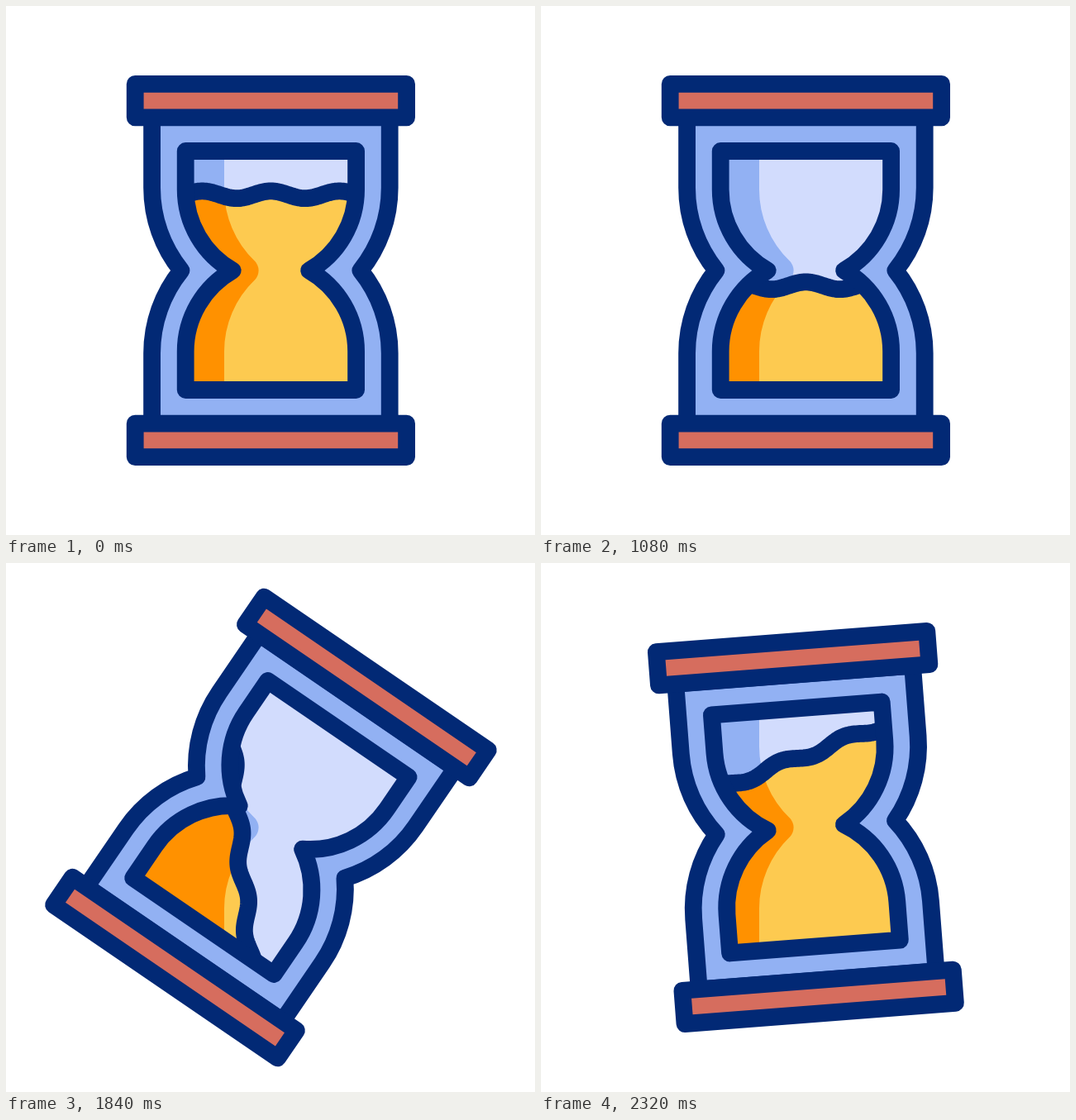
Write an HTML page with a canvas that moves like this. It is 640x640 px and loops after 2.36 s.

```html
<!DOCTYPE html>
<html lang="en">
<head>
<meta charset="utf-8">
<title>Hourglass</title>
<style>
  html, body { margin: 0; height: 100%; overflow: hidden; background: #fff; }
  canvas { display: block; width: 100vw; height: 100vh; }
</style>
</head>
<body>
<canvas id="stage" width="640" height="640"></canvas>
<script>
const ctx = document.getElementById('stage').getContext('2d');

const LOOP = 2360, STEP = 40, FLIP_START = 1680;
const CENTER = { x: 320.4, y: 320 };
const LEVEL_FULL = -91.7, LEVEL_LOW = 79.4;
const COLORS = {
  line: '#022975', wood: '#d66d5e', frame: '#92b1f3',
  air: '#d2dcfd', airShade: '#92b1f3', sand: '#fdca50', sandShade: '#ff9100'
};

// Waisted outline: straight sides, then circular arcs meeting at the neck.
function glassPath(half, top, bend, neck) {
  const dx = half - neck;
  const r = (dx * dx + bend * bend) / (2 * dx);
  const a = Math.asin(bend / r);
  const p = new Path2D();
  p.moveTo(-half, -top);
  p.lineTo(half, -top);
  p.arc(half - r, -bend, r, 0, a);
  p.arc(half - r, bend, r, -a, 0);
  p.lineTo(half, top);
  p.lineTo(-half, top);
  p.arc(r - half, bend, r, Math.PI, Math.PI + a);
  p.arc(r - half, -bend, r, Math.PI - a, Math.PI);
  p.closePath();
  return p;
}

// The shaded area stays upright while the glass turns.
function shadePath() {
  const edge = -56.4, bend = 98, r = 120, tip = 16.5;
  const a = Math.asin(86.5 / r);
  const p = new Path2D();
  p.moveTo(-320, -320);
  p.lineTo(edge, -320);
  p.arc(edge + r, -bend, r, Math.PI, Math.PI - a, true);
  p.arc(-31.3, 0, tip, -a, a);
  p.arc(edge + r, bend, r, Math.PI + a, Math.PI, true);
  p.lineTo(edge, 320);
  p.lineTo(-320, 320);
  p.closePath();
  return p;
}

function wavePath(closed) {
  const p = new Path2D();
  for (let x = -220; x <= 220; x += 2) {
    p.lineTo(x, -4.4 * Math.cos(x * 2 * Math.PI / 83));
  }
  if (closed) {
    p.lineTo(220, 500);
    p.lineTo(-220, 500);
    p.closePath();
  }
  return p;
}

const outer = glassPath(143.8, 185.5, 100, 108.4);
const inner = glassPath(103.2, 144.5, 98, 46.2);
const shade = shadePath();
const surface = wavePath(false);
const sandBody = wavePath(true);

// Cubic bezier easing (1/6, 0, 5/6, 1), solved by bisection.
function ease(u) {
  let lo = 0, hi = 1;
  for (let i = 0; i < 30; i++) {
    const s = (lo + hi) / 2, q = 1 - s;
    const x = q * q * s / 2 + 2.5 * q * s * s + s * s * s;
    if (x < u) lo = s; else hi = s;
  }
  return lo * lo * (3 - 2 * lo);
}

function pose(angle, y = 0) {
  ctx.setTransform(1, 0, 0, 1, CENTER.x, CENTER.y);
  ctx.rotate(angle);
  ctx.translate(0, y);
}

function fill(path, color) {
  ctx.fillStyle = color;
  ctx.fill(path);
}

function drawContents(waveAngle, level) {
  pose(0);
  ctx.fillStyle = COLORS.air;
  ctx.fillRect(-320, -320, 640, 640);
  fill(shade, COLORS.airShade);

  ctx.save();
  pose(waveAngle, level);
  ctx.clip(sandBody);
  pose(0);
  ctx.fillStyle = COLORS.sand;
  ctx.fillRect(-320, -320, 640, 640);
  fill(shade, COLORS.sandShade);
  ctx.restore();

  pose(waveAngle, level);
  ctx.stroke(surface);
}

function drawBar(y) {
  ctx.fillStyle = COLORS.wood;
  ctx.beginPath();
  ctx.rect(-164.2, y - 20.2, 328.4, 40.4);
  ctx.fill();
  ctx.stroke();
}

function draw(time) {
  const t = Math.floor((time % LOOP) / STEP) * STEP;
  const flip = Math.max(0, (t - FLIP_START) / (LOOP - FLIP_START));
  const run = flip > 0 ? 1 - flip : t / FLIP_START;
  const level = LEVEL_FULL + (LEVEL_LOW - LEVEL_FULL) * run;
  const glassAngle = flip > 0 ? Math.PI * ease(flip) : 0;

  ctx.setTransform(1, 0, 0, 1, 0, 0);
  ctx.fillStyle = '#fff';
  ctx.fillRect(0, 0, 640, 640);
  ctx.strokeStyle = COLORS.line;
  ctx.lineWidth = 20.8;
  ctx.lineJoin = ctx.lineCap = 'round';

  pose(glassAngle);
  fill(outer, COLORS.frame);
  ctx.stroke(outer);

  ctx.save();
  ctx.clip(inner);
  drawContents(2 * Math.PI * flip, level);
  ctx.restore();

  pose(glassAngle);
  ctx.stroke(inner);
  drawBar(-205.4);
  drawBar(205.4);
}

let start;
function tick(now) {
  if (start === undefined) start = now;
  draw(Math.max(0, now - start));
  requestAnimationFrame(tick);
}
draw(0);
requestAnimationFrame(tick);
</script>
</body>
</html>
```
